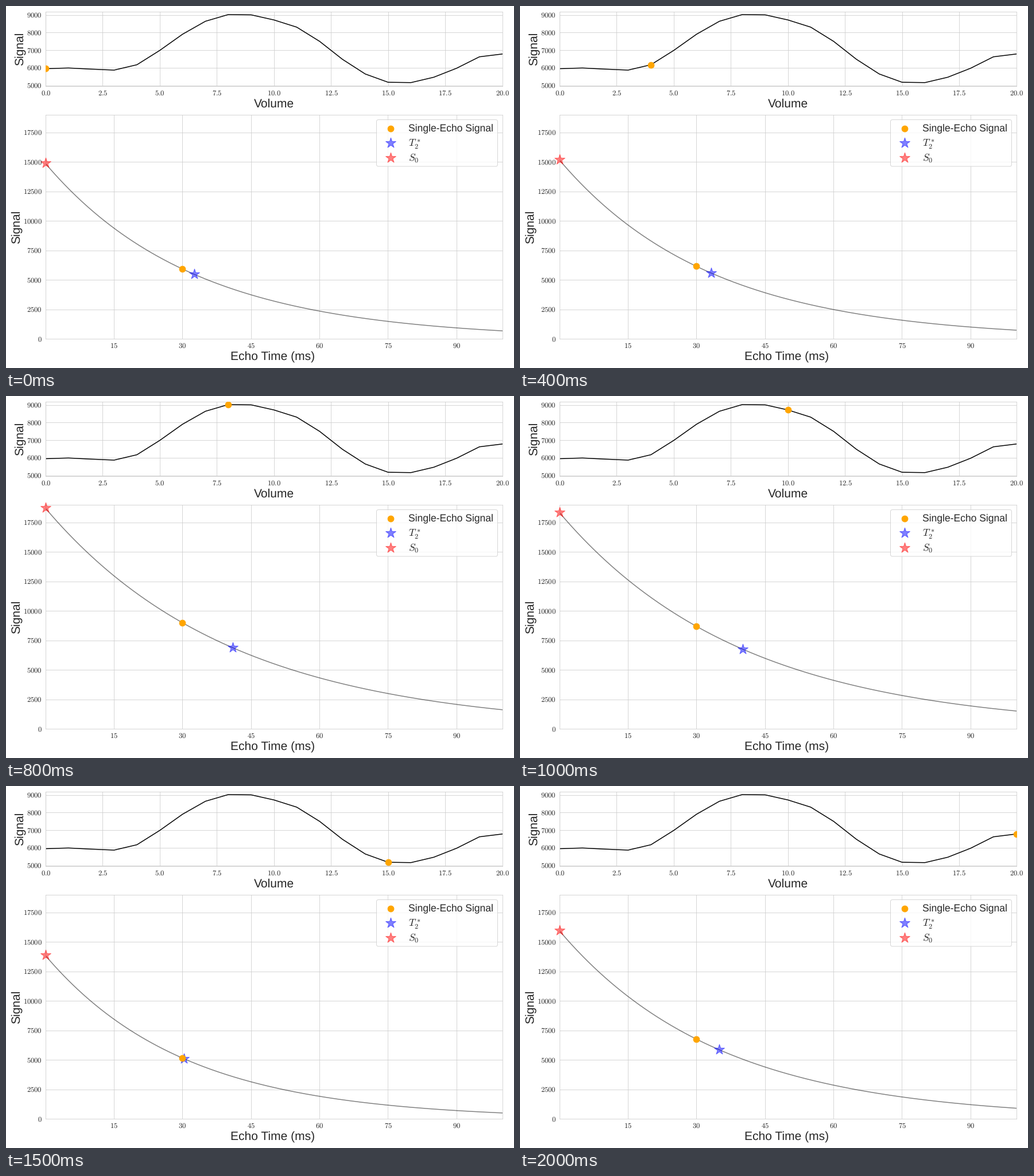
Animation of 885 by 632 pixels, one loop 2.1 s. Source, as a matplotlib script:

```python
import numpy as np
import matplotlib.pyplot as plt
from matplotlib.animation import FuncAnimation
from matplotlib.patches import FancyBboxPatch

W, H, DPI = 885, 632, 72
LEFT, RIGHT = 69, 864.5
INK, RULE = "0.15", "0.8"
DOT = dict(s=115, color="orange", zorder=5)
STAR = dict(s=355, marker="*", alpha=0.5, zorder=4)

plt.rcParams.update({"font.family": "Liberation Sans", "mathtext.fontset": "cm",
                     "text.hinting": "none"})

# Mono-exponential decay: S0 and T2* scale together with the BOLD response
ECHO = 30
S0, T2 = 16000, 35
signal = np.array([5945, 5985, 5920, 5865, 6170, 6985, 7905, 8640, 9020, 9005, 8715,
                   8305, 7500, 6480, 5645, 5175, 5155, 5460, 5970, 6620, 6780])
volume = np.arange(len(signal))
grid = np.linspace(0.7, 1.4, 2000)
scale = np.interp(signal, S0 * grid * np.exp(-ECHO / (T2 * grid)), grid)
echo_times = np.linspace(0.1, 100, 400)

fig = plt.figure(figsize=(W / DPI, H / DPI), dpi=DPI, facecolor="white")


def panel(top, bottom, xlim, ylim, xticks, yticks):
    ax = fig.add_axes([LEFT / W, 1 - bottom / H, (RIGHT - LEFT) / W, (bottom - top) / H])
    ax.set(xlim=xlim, ylim=ylim, xticks=xticks, yticks=yticks)
    ax.tick_params(length=0, labelbottom=False, labelleft=False)
    ax.set_axisbelow(True)
    ax.grid(color=RULE, lw=0.8)
    for spine in ax.spines.values():
        spine.set(color=RULE, linewidth=0.8)
    return ax


def put(x, y, text, size, ha="center", **kw):
    stage.text(x, y, text, size=size, ha=ha, va="baseline", color=INK, **kw)


def tick_labels(ax, top, bottom, fmt):
    (x0, x1), (y0, y1) = ax.get_xlim(), ax.get_ylim()
    for v in ax.get_xticks():
        x = LEFT + (v - x0) / (x1 - x0) * (RIGHT - LEFT)
        put(x + 0.3, bottom + 15.5, f"${v:{fmt}}$", 12.6)
    for v in ax.get_yticks():
        y = bottom - (v - y0) / (y1 - y0) * (bottom - top)
        put(63, y + 4.2, f"${v:.0f}$", 12.6, ha="right")


def axis_labels(x, top, bottom, xlabel, xlabel_pos):
    put(x, (top + bottom) / 2, "Signal", 21, rotation=90, rotation_mode="anchor")
    put(*xlabel_pos, xlabel, 21)


SERIES, DECAY = (9.75, 140.05), (190.1, 581.45)
series = panel(*SERIES, (0, 20), (4950, 9190), np.arange(0, 21, 2.5), np.arange(5000, 9001, 1000))
decay = panel(*DECAY, (0.1, 100), (0, 19000), np.arange(15, 91, 15), np.arange(0, 17501, 2500))

# Overlay in pixel units for all text and the legend
stage = fig.add_axes([0, 0, 1, 1], zorder=10)
stage.set(xlim=(0, W), ylim=(H, 0))
stage.axis("off")

tick_labels(series, *SERIES, ".1f")
tick_labels(decay, *DECAY, ".0f")
axis_labels(29.5, *SERIES, "Volume", (466.5, 177))
axis_labels(23.5, *DECAY, "Echo Time (ms)", (465, 618))

stage.add_patch(FancyBboxPatch((645.5, 198.5), 211, 81.5, boxstyle="round,pad=0,rounding_size=3.5",
                               fc="white", ec=RULE, lw=1, alpha=0.8))
stage.scatter(670.3, 214.3, **DOT)
stage.scatter(670.3, 239.3, c="blue", **STAR)
stage.scatter(670.3, 264.8, c="red", **STAR)
put(701, 218.7, "Single-Echo Signal", 17.5, ha="left")
put(701, 244.5, "$T_2^*$", 17.5, ha="left")
put(701, 270, "$S_0$", 17.5, ha="left")

series.plot(volume, signal, color="black", lw=1.5)
now = series.scatter(0, signal[0], **DOT)
curve, = decay.plot([], [], color="black", alpha=0.5, lw=1.5)
echo = decay.scatter(ECHO, signal[0], **DOT)
t2_star = decay.scatter(T2, 0, c="blue", **STAR)
s0_star = decay.scatter(0.1, S0, c="red", clip_on=False, **STAR)


def update(i):
    s0, t2 = S0 * scale[i], T2 * scale[i]
    now.set_offsets([[volume[i], signal[i]]])
    curve.set_data(echo_times, s0 * np.exp(-echo_times / t2))
    echo.set_offsets([[ECHO, signal[i]]])
    t2_star.set_offsets([[t2, s0 / np.e]])
    s0_star.set_offsets([[echo_times[0], s0]])
    return now, curve, echo, t2_star, s0_star


anim = FuncAnimation(fig, update, frames=len(volume), interval=100, repeat=True)
plt.show()
```
